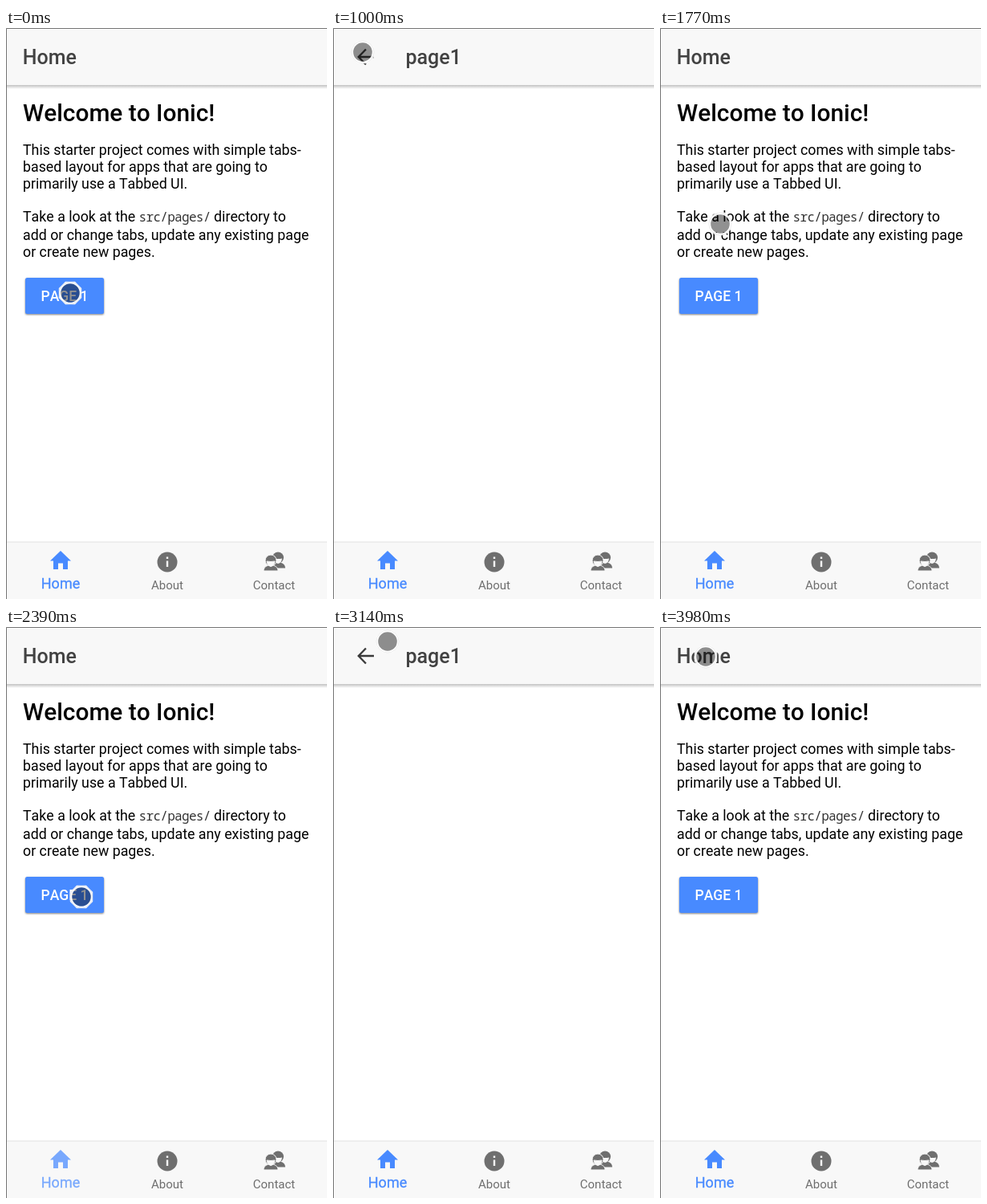
Write an HTML page that moves like this. It is 400 px wide and 711 px high and loops after 4.29 s.

```html
<!DOCTYPE html>
<html lang="en">
<head>
<meta charset="utf-8">
<title>Tabs starter</title>
<style>
  html, body { margin: 0; width: 100%; height: 100%; overflow: hidden; background: #fff; }
  svg { display: block; width: 100%; height: 100%; }
  text { font-family: Roboto, sans-serif; font-size: 17.8px; font-kerning: none; white-space: pre; }
  .title { font-size: 25px; font-weight: 500; fill: #424242; }
  .heading { font-size: 29.8px; font-weight: 500; }
  .code { font-family: "Noto Sans Mono", monospace; font-size: 16px; font-weight: 300; letter-spacing: -.7px; fill: #333; }
  .button { font-size: 17.5px; font-weight: 500; fill: #fff; }
  .button, .tab { text-anchor: middle; }
  .tab { font-size: 15px; }
  #homeTab { fill: #488aff; }
  #homeTab text { font-size: 18px; stroke: #488aff; stroke-width: .3; }
  #pageButton { fill: #488aff; filter: drop-shadow(0 1px 1.2px rgba(0, 0, 0, .5)); }
</style>
</head>
<body>
<svg viewBox="0 0 400 711">
  <defs>
    <linearGradient id="shade" x2="0" y2="1">
      <stop stop-opacity=".24"/>
      <stop offset="1" stop-opacity="0"/>
    </linearGradient>
    <g id="header">
      <rect width="400" height="71" fill="#f8f8f8"/>
      <rect y="71" width="400" height="5" fill="url(#shade)"/>
    </g>
    <g id="person">
      <circle cy="-5" r="7"/>
      <path d="M-9 8C-9 3-5 2-3 1H3C5 2 9 3 9 8Z"/>
      <path d="M-5-4Q0-3 5-4Q4.500 1.500 0 2.500Q-4.500 1.500-5-4Z" fill="#f8f8f8"/>
    </g>
  </defs>

  <rect width="400" height="711" fill="#fff"/>

  <g id="homePage">
    <use href="#header"/>
    <text class="title" x="20.800" y="45">Home</text>
    <text class="heading" x="21" y="116">Welcome to Ionic!</text>
    <text x="21" y="158">This starter project comes with simple tabs-</text>
    <text x="21" y="179">based layout for apps that are going to</text>
    <text x="21" y="200">primarily use a Tabbed UI.</text>
    <text x="21" y="241">Take a look at the <tspan class="code">src/pages/</tspan> directory to</text>
    <text x="21" y="264">add or change tabs, update any existing page</text>
    <text x="21" y="285">or create new pages.</text>
    <rect id="pageButton" x="24" y="311" width="98" height="45" rx="2.500"/>
    <text class="button" x="73" y="340">PAGE 1</text>
  </g>

  <g id="detailPage">
    <rect width="400" height="711" fill="#fff"/>
    <use href="#header"/>
    <path d="M51 36H33M41 26.500L31.800 36L41 45.500" fill="none" stroke="#3a3a3a" stroke-width="2.300"/>
    <text class="title" x="90.500" y="45">page1</text>
  </g>

  <rect y="640" width="400" height="71" fill="#f8f8f8"/>
  <rect y="639.500" width="400" height="1" fill="#e2e2e2"/>
  <g id="homeTab">
    <path d="M55 663.500L68 651L81 663.500H77V674H71V666.500H65V674H59V663.500Z"/>
    <text class="tab" x="68" y="698">Home</text>
  </g>
  <g fill="#6f6f6f">
    <circle cx="201" cy="665" r="12.500"/>
    <path d="M199.800 658.500h2.400v2.500h-2.400zM199.800 663.500h2.400v7.500h-2.400z" fill="#f8f8f8"/>
    <text class="tab" x="201" y="699">About</text>
    <use href="#person" x="339" y="664.500"/>
    <use href="#person" x="330" y="668" stroke="#f8f8f8"/>
    <text class="tab" x="334" y="699">Contact</text>
  </g>

  <g id="pointer">
    <path d="M-6-14.200H6L14.200-6V6L6 14.200H-6L-14.200 6V-6ZM-11.500 0A11.500 11.500 0 1 0 11.500 0A11.500 11.500 0 1 0-11.500 0Z"
      fill="#fff" fill-rule="evenodd" opacity=".94"/>
    <circle r="14" fill="none" stroke="#000" stroke-width=".6" opacity=".13"/>
    <circle r="11.800" opacity=".43"/>
  </g>

  <path d="M.5 711V.5H400" fill="none" stroke="#757575"/>
</svg>
<script>
const LOOP = 4290;
const byId = id => document.getElementById(id);
const detailPage = byId('detailPage'), homeTab = byId('homeTab'), pointer = byId('pointer');

// Screen refreshes come in bursts: start, end, number of steps.
const bursts = [
  [0, 0, 1], [610, 1000, 6], [1530, 2010, 7], [2080, 2160, 2],
  [2390, 2390, 1], [2830, 3140, 5], [3290, 3430, 3], [3830, 3980, 3]
];

// Pointer path: time, x, y.
const path = [
  [0, 80, 330], [610, 79, 306], [850, 44, 76], [1000, 37, 30],
  [1530, 38, 38], [1610, 47, 92], [1770, 75, 244], [2010, 76, 313], [2160, 81, 333],
  [2390, 94, 336], [2830, 92, 312], [2990, 76, 100], [3140, 68, 18],
  [3290, 65, 23], [3430, 57, 37], [LOOP, 57, 37]
];

const pushes = [610, 2830], pops = [1510, 3810];
const PUSH_MS = 280, POP_MS = 170;

function snap(t) {
  const [start, end, steps] = bursts.findLast(b => b[0] <= t);
  if (t >= end) return end;
  const step = (end - start) / (steps - 1);
  return start + Math.floor((t - start) / step) * step;
}

function pointerAt(t) {
  const i = path.findIndex(p => p[0] > t);
  const [t0, x0, y0] = path[i - 1], [t1, x1, y1] = path[i];
  const k = (t - t0) / (t1 - t0);
  return [x0 + (x1 - x0) * k, y0 + (y1 - y0) * k];
}

// How far the detail page has come in: 0 is hidden, 1 is in place.
function presence(t) {
  const pushed = pushes.findLast(s => s <= t);
  if (pushed === undefined) return 0;
  const popped = pops.find(s => s > pushed);
  if (t >= popped) return 1 - Math.min(1, (t - popped) / POP_MS) ** 1.7;
  const left = 1 - Math.min(1, (t - pushed) / PUSH_MS);
  return 1 - 0.88 * left ** 3.5;
}

function draw(now) {
  const t = snap(now % LOOP);
  const shown = presence(t);
  detailPage.setAttribute('opacity', shown);
  detailPage.setAttribute('transform', `translate(0 ${50 * (1 - shown)})`);
  pointer.setAttribute('transform', `translate(${pointerAt(t)})`);
  homeTab.setAttribute('opacity', t >= 2390 && t < 2830 ? 0.72 : 1);
}

const began = performance.now();
function tick() {
  draw(performance.now() - began);
  requestAnimationFrame(tick);
}
tick();
</script>
</body>
</html>
```
